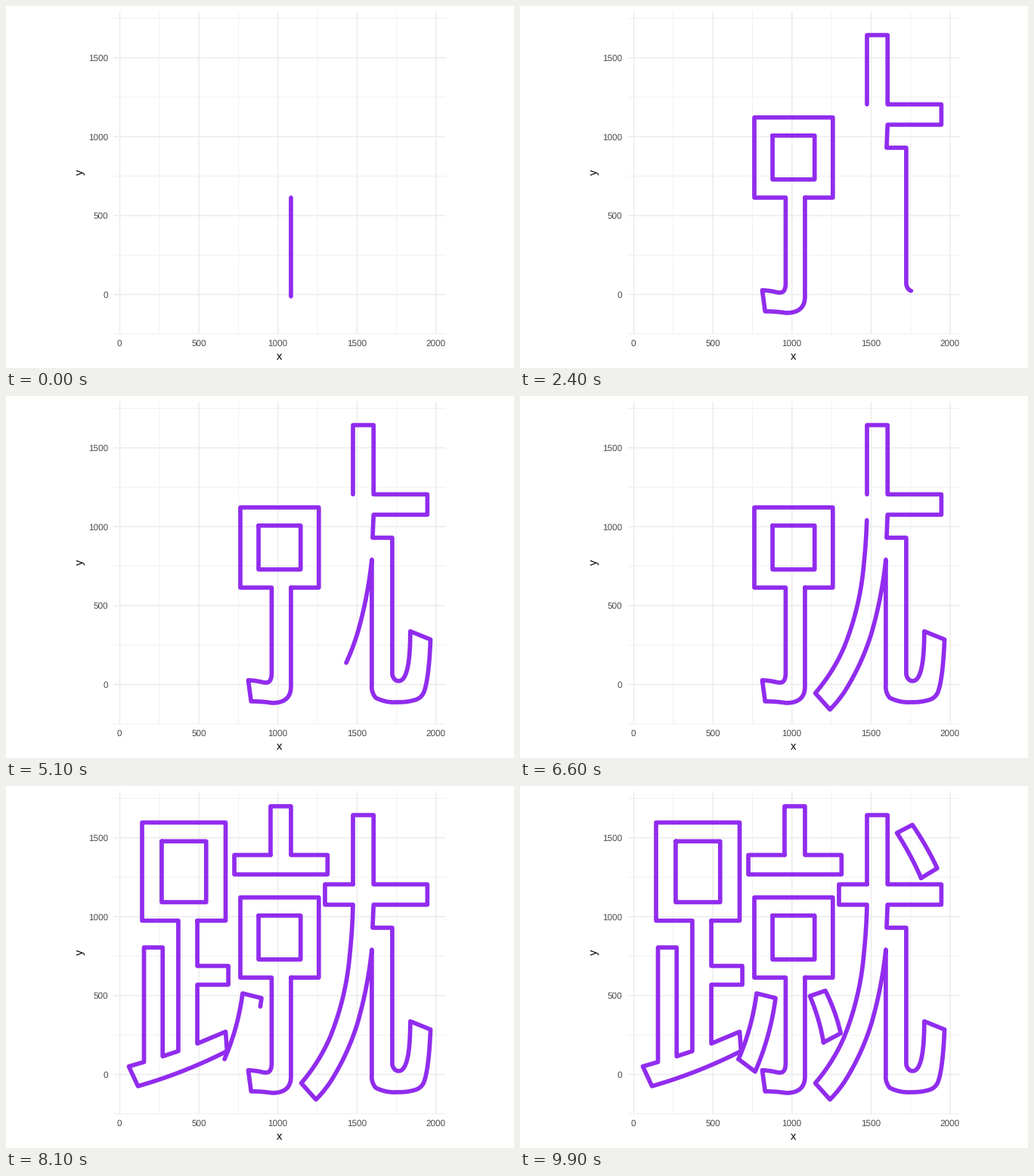
Animation of 672x480 px, one loop 10000 ms. Source, as a matplotlib script:

```python
import numpy as np
import matplotlib.pyplot as plt
from matplotlib.animation import FuncAnimation

W, H, DPI = 672, 480, 96
FRAMES, INTERVAL = 100, 100
STEPS = 18  # samples per curve
PURPLE, GRID, TICK = "#912CEE", "#EBEBEB", "#4D4D4D"
LEFT, RIGHT, TOP, BOTTOM = 142.3, 581.3, 7.5, 434.9

plt.rcParams.update({"font.family": "Liberation Sans", "text.hinting": "none",
                     "path.simplify": False, "path.snap": False})


def px(n):
    """Pixels to points."""
    return n * 72 / DPI


def sx(v):
    return 150.5 + v * 0.2093


def sy(v):
    return 382.5 - v * 0.2092


class Pen:
    """Records an outline in chart units, one point per corner or sample."""

    def __init__(self, x, y):
        self.pts = [(x, y)]

    def to(self, x, y):
        self.pts.append((x, y))
        return self

    def h(self, x):
        return self.to(x, self.pts[-1][1])

    def v(self, y):
        return self.to(self.pts[-1][0], y)

    def curve(self, cx, cy, x, y):
        x0, y0 = self.pts[-1]
        for t in np.arange(1, STEPS + 1) / STEPS:
            a, b, c = (1 - t) ** 2, 2 * t * (1 - t), t * t
            self.to(a * x0 + b * cx + c * x, a * y0 + b * cy + c * y)
        return self

    def arc(self, x, y, bow):
        """Curve that swells to the left by a share of its chord."""
        x0, y0 = self.pts[-1]
        dx, dy = x - x0, y - y0
        return self.curve(x0 + dx / 2 - bow * dy, y0 + dy / 2 + bow * dx, x, y)

    def turn_v(self, x, y):
        """Rounded corner that leaves vertically."""
        return self.curve(self.pts[-1][0], y, x, y)

    def turn_h(self, x, y):
        """Rounded corner that leaves horizontally."""
        return self.curve(x, self.pts[-1][1], x, y)

    def close(self):
        return self.to(*self.pts[0])


def box(x0, y0, x1, y1):
    return Pen(x0, y1).v(y0).h(x1).v(y1).close()


def blade(a, b, c, d, bow):
    """Short brush stroke: two sides bent the same way."""
    return Pen(*a).arc(*b, -bow).to(*c).arc(*d, bow).close()


def hook():
    p = Pen(1082, 614).v(-12).turn_v(963, -117).arc(830, -107, -0.04)
    p.to(812, 27).arc(913, 12, 0.05).h(925).turn_h(960, 74)
    return p.v(614).h(762).v(1122).h(1258).v(614).close()


def legs():
    p = Pen(1474, 1205).v(1644).h(1604).v(1205).h(1944).v(1076).h(1604)
    p.to(1598, 930).h(1722).v(74)
    p.arc(1733, 38, -0.17).arc(1763, 22, -0.26).turn_h(1836, 337)
    p.to(1964, 285).curve(1954, 45, 1925, -41).arc(1866, -98, 0.26)
    p.arc(1756, -112, 0.08).arc(1617, -84, 0.14).arc(1593, -2, 0.2).v(791)
    p.arc(1503, 327, 0.044).arc(1335, -41, 0.066).arc(1240, -159, 0.05)
    p.to(1147, -55).arc(1330, 238, -0.075).arc(1454, 762, -0.075)
    return p.arc(1474, 1076, -0.02).h(1297).v(1205).close()


def lid():
    p = Pen(953, 1391).v(1700).h(1082).v(1391).h(1313)
    return p.v(1268).h(724).v(1391).close()


def foot():
    p = Pen(490, 975).v(688).h(686).v(569).h(490).v(196)
    p.to(669, 271).to(678, 148).arc(115, -74, 0.048).to(57, 51).to(153, 79)
    p.v(805).h(271).v(115).to(370, 148).v(975)
    return p.h(141).v(1597).h(669).v(975).close()


OUTLINES = [
    hook(), box(877, 729, 1143, 1007), legs(), lid(),
    foot(), box(265, 1092, 546, 1478),
    blade((662, 97), (776, 514), (896, 484), (767, 18), 0.07),
    blade((1199, 203), (1113, 497), (1211, 531), (1308, 261), 0.06),
    blade((1816, 1245), (1663, 1531), (1761, 1582), (1918, 1307), 0.04),
]
PATHS = [np.array(o.pts, float) for o in OUTLINES]
LAST = sum(map(len, PATHS)) - 1

fig = plt.figure(figsize=(W / DPI, H / DPI), dpi=DPI, facecolor="white")
ax = fig.add_axes([0, 0, 1, 1])
ax.set(xlim=(0, W), ylim=(H, 0))
ax.axis("off")


def grid(xs, ys, width):
    style = dict(color=GRID, lw=px(width), solid_capstyle="butt", zorder=1)
    for x in xs:
        ax.plot([sx(x)] * 2, [TOP, BOTTOM], **style)
    for y in ys:
        ax.plot([LEFT, RIGHT], [sy(y)] * 2, **style)


grid(range(250, 2000, 500), range(-250, 2000, 500), 0.71)
grid(range(0, 2001, 500), range(0, 1501, 500), 1.42)

label = dict(color=TICK, fontsize=8.8, va="baseline")
for v in range(0, 2001, 500):
    ax.text(sx(v) - 0.3, 451.2, str(v), ha="center", **label)
for v in range(0, 1501, 500):
    ax.text(135.3, sy(v) + 4.2, str(v), ha="right", **label)

title = dict(color="black", fontsize=11, ha="center", va="baseline")
ax.text(361.7, 469, "x", **title)
ax.text(103, 220.7, "y", rotation=90, rotation_mode="anchor", **title)

lines = [ax.plot([], [], color=PURPLE, lw=px(5.69), solid_capstyle="round",
                 solid_joinstyle="round", zorder=3)[0] for _ in PATHS]


def draw(frame):
    # the pen passes the points at a steady rate
    left = 2 + frame * (LAST - 1) // (FRAMES - 1)
    for line, path in zip(lines, PATHS):
        shown = path[:max(left, 0)]
        if len(shown) < 2:
            shown = path[:0]
        line.set_data(sx(shown[:, 0]), sy(shown[:, 1]))
        left -= len(path)
    return lines


anim = FuncAnimation(fig, draw, frames=FRAMES, interval=INTERVAL,
                     repeat=True, repeat_delay=0)
plt.show()
```
